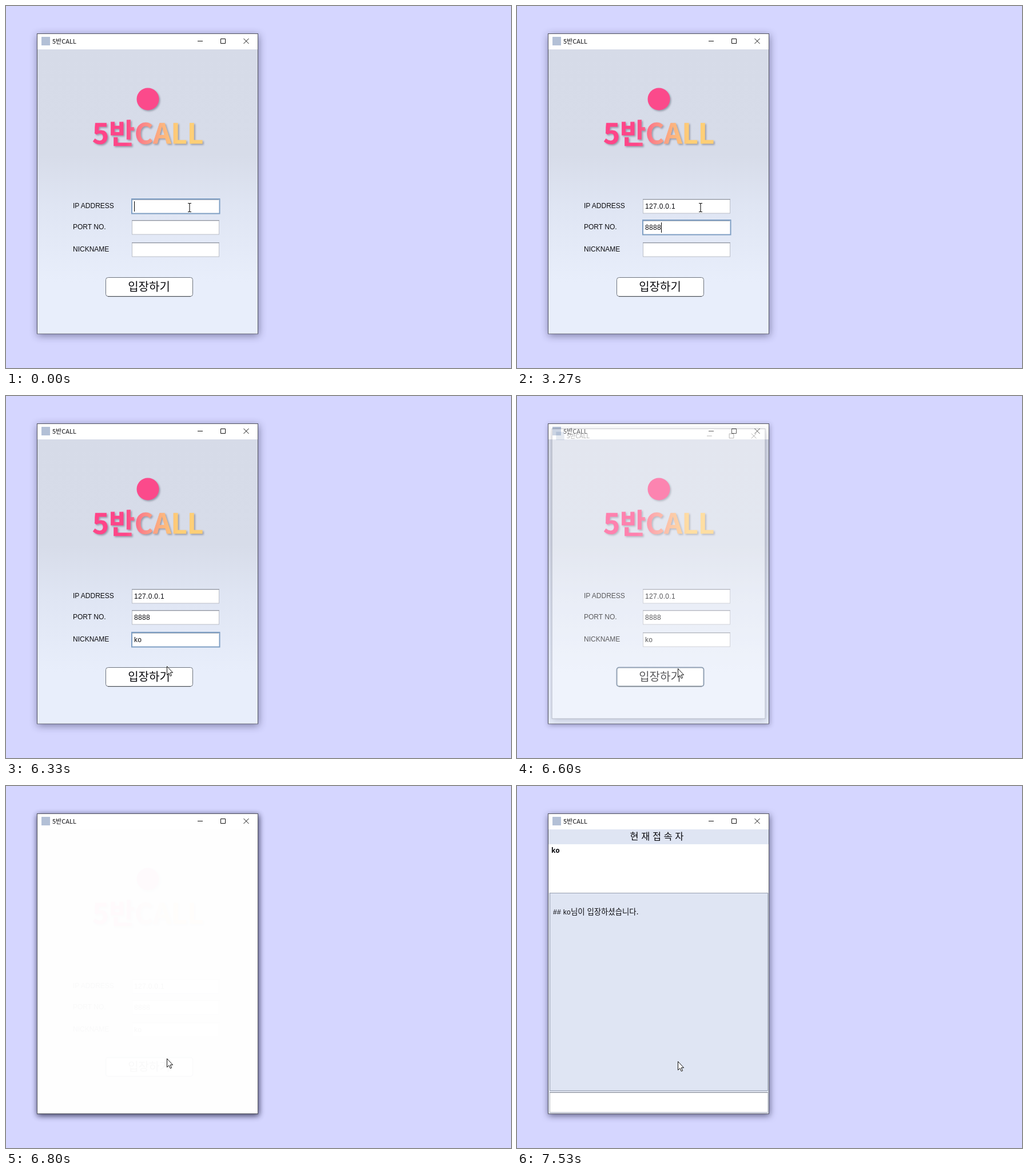
Animation of 883 by 634 pixels, one loop 8 s. Source, as an HTML page:

```html
<!DOCTYPE html>
<html lang="ko">
<head>
<meta charset="utf-8">
<title>5반CALL</title>
<style>
html, body { margin: 0; width: 100%; height: 100%; overflow: hidden; background: #d5d6ff; }
svg { display: block; width: 100vw; height: 100vh; }
text { white-space: pre; font-family: "Liberation Sans", Arial, sans-serif; font-size: 12px; fill: #0c0c10; }
.ko { font-family: "Noto Sans CJK KR", "Noto Sans CJK JP", "Noto Sans CJK", sans-serif; }
.value { letter-spacing: .33px; }
.logo { font-size: 49px; font-weight: 900; fill: url(#candy); stroke: url(#candy); stroke-width: .6; }
.brand { filter: drop-shadow(2px 2px 1.5px rgba(60, 60, 80, .4)); }
.line { fill: none; stroke: #111; }
.pane { stroke: #51525f; }
.box { fill: #fff; stroke: #bbbfc8; }
.ring { fill: #fff; stroke: #7f9fc4; stroke-width: 2; }
#next { transform-origin: 247.5px 310.5px; }
</style>
</head>
<body>
<svg viewBox="0 0 883 634">
  <defs>
    <linearGradient id="candy" gradientUnits="userSpaceOnUse" x1="152" y1="0" x2="344" y2="0">
      <stop offset=".3" stop-color="#ff4588"/>
      <stop offset=".46" stop-color="#fb8888"/>
      <stop offset=".62" stop-color="#fcb17f"/>
      <stop offset=".78" stop-color="#ffcf76"/>
    </linearGradient>
    <linearGradient id="sky" x1="0" y1="0" x2="0" y2="1">
      <stop offset="0" stop-color="#d6dbe8"/>
      <stop offset=".37" stop-color="#d7dce9"/>
      <stop offset=".55" stop-color="#dfe5f3"/>
      <stop offset=".82" stop-color="#e8eefb"/>
      <stop offset="1" stop-color="#e8eefb"/>
    </linearGradient>
    <g id="frame">
      <rect class="pane" x="54.5" y="48.5" width="386" height="525.5" fill="#fff"/>
      <rect x="62" y="54" width="15" height="15" fill="#b3c0d6"/>
      <text class="ko" x="81" y="66" style="font-size:11px">5반CALL</text>
      <path class="line" d="M335 61.5H344M375.5 57.5H383.5V65.5H375.5ZM415.5 57L424.5 66M424.5 57L415.5 66"/>
    </g>
  </defs>

  <g id="login">
    <use href="#frame" id="loginFrame"/>
    <rect x="55" y="76" width="385" height="497.5" fill="url(#sky)"/>
    <g class="brand">
      <circle cx="248" cy="163" r="19.5" fill="#fb4a8b"/>
      <text class="ko logo" x="151" y="241">5반CALL</text>
    </g>
    <g id="fields"></g>
    <rect id="button" x="174.5" y="475.5" width="152" height="33" rx="4" fill="#fff"/>
    <path d="M178 508.7H323" stroke="#3f444c"/>
    <text class="ko" x="250" y="499" text-anchor="middle" style="font-size:20px">입장하기</text>
    <rect id="caret" width="1" height="18"/>
  </g>

  <g id="next">
    <use href="#frame" id="nextFrame"/>
    <g id="chat">
      <rect x="55" y="76" width="385" height="497" fill="#e4e9f4"/>
      <rect x="55" y="76" width="385" height="26" fill="#dfe5f3"/>
      <text class="ko" x="244.5" y="94" text-anchor="middle" style="font-size:16.4px;font-weight:500">현 재 접 속 자</text>
      <rect x="55" y="102" width="385" height="85" fill="#fff"/>
      <text x="60" y="117" style="font:bold 12px 'Open Sans',sans-serif">ko</text>
      <rect x="57.5" y="187.5" width="381" height="346" fill="#dfe5f3" stroke="#969eb0"/>
      <text class="value" x="63" y="225">## ko<tspan class="ko" style="font-size:13.4px;letter-spacing:0">님이 입장하셨습니다.</tspan></text>
      <rect class="box" x="57.5" y="536.5" width="381" height="35"/>
      <path d="M57 536.5H439" stroke="#8d929d"/>
      <path d="M58 537.5H438" stroke="#d9dbe0"/>
    </g>
  </g>

  <g id="arrow">
    <path d="M.5 .5V15.5L3.9 12.3L6.3 17.6L8.6 16.6L6.2 11.4H10.6Z" fill="#fff" stroke="#111"/>
  </g>
  <g id="beam" fill="none">
    <path d="M-3 -7.5H-1L0 -6.5L1 -7.5H3M0 -6.5V6.5M-3 7.5H-1L0 6.5L1 7.5H3" stroke="#fff" stroke-width="2.6"/>
    <path d="M-3 -7.5H-1L0 -6.5L1 -7.5H3M0 -6.5V6.5M-3 7.5H-1L0 6.5L1 7.5H3" stroke="#111" stroke-width="1.1"/>
  </g>
</svg>
<script>
const LOOP = 8000;
const $ = id => document.getElementById(id);

const fields = [
  { label: 'IP ADDRESS', y: 338, text: '127.0.0.1', keys: [270, 400, 600, 800, 930, 1070, 1600, 1870, 2070] },
  { label: 'PORT NO.', y: 375, text: '8888', keys: [2800, 3000, 3130, 3270] },
  { label: 'NICKNAME', y: 414, text: 'ko', keys: [4800, 5400] }
];
const focusTimes = [0, 2270, 3530, 6470];
const caretOff = [[2730, 2800], [4070, 4530], [5270, 5400], [5870, 6400]];

// [time, opacity, scale] of the opening window
const opening = [[0, 0, 1], [6530, .1, .955], [6600, .32, .966], [6670, .65, .985], [6730, .88, .996], [6800, .975, 1], [6870, 1, 1]];
const rests = [[6400, 281, 475], [6470, 281, 477], [7530, 281, 482]];
const chatTime = 6870;

const lastAt = (steps, t) => steps.filter(s => s[0] <= t).pop();

$('fields').innerHTML = fields.map(({ label, y }) => `
  <text x="117" y="${y + 16}">${label}</text>
  <rect class="box" x="220.5" y="${y + .5}" width="152" height="24.5"/>
  <path d="M220 ${y + .5}H373" stroke="#8f949f"/>
  <path d="M221 ${y + 1.5}H372" stroke="#d8dae0"/>
  <g class="focus">
    <rect class="ring" x="220" y="${y}" width="153.5" height="25.5"/>
    <path d="M221 ${y + 1.5}H372" stroke="#a9b0bc"/>
  </g>
  <text class="value" x="224" y="${y + 17}"></text>`).join('');
const values = document.querySelectorAll('#fields .value');
const rings = document.querySelectorAll('#fields .focus');

const show = (el, on) => el.setAttribute('visibility', on ? 'visible' : 'hidden');
const shadow = (el, y, blur, alpha) => {
  el.style.filter = `drop-shadow(1px ${y}px ${blur}px rgba(15, 15, 50, ${alpha}))`;
};

function pointer(t) {
  if (t >= 6400) return lastAt(rests, t).slice(1);
  if (t < 5870) return [321, 353];
  const p = Math.min(1, (Math.floor((t - 5870) / 65) + 1) / 8);
  const eased = p * p * (3 - 2 * p);
  return [321 - 40 * eased, 353 + 120 * eased];
}

function drawPointer(t) {
  const [x, y] = pointer(t).map(Math.round);
  const overField = t < 6330 && fields.some(f => y >= f.y && y <= f.y + 25);
  for (const id of ['arrow', 'beam']) {
    $(id).setAttribute('transform', `translate(${x} ${y})`);
    show($(id), overField === (id === 'beam'));
  }
}

function drawLogin(t) {
  const active = focusTimes.filter(f => f <= t).length - 1;
  fields.forEach((f, i) => {
    values[i].textContent = f.text.slice(0, f.keys.filter(k => k <= t).length);
    show(rings[i], i === active);
  });
  const typing = active < fields.length;
  show($('caret'), typing && !caretOff.some(([a, b]) => t >= a && t < b));
  if (typing) {
    const width = values[active].textContent ? values[active].getComputedTextLength() : 0;
    $('caret').setAttribute('x', 224 + Math.floor(width + .1));
    $('caret').setAttribute('y', fields[active].y + 4);
  }
  $('button').setAttribute('stroke', typing ? '#6d737d' : '#5f7591');
  $('button').setAttribute('stroke-width', typing ? 1 : 2);
  if (t < 6530) shadow($('loginFrame'), 3, 7, .45);
  else shadow($('loginFrame'), 2, 4, .35);
}

function drawNext(t) {
  const [, opacity, scale] = lastAt(opening, t);
  $('next').style.opacity = opacity;
  $('next').style.transform = `scale(${scale})`;
  show($('chat'), t >= chatTime);
  show($('login'), t < chatTime);
  if (t >= chatTime) show($('caret'), false);
  if (t >= chatTime) rings.forEach(r => show(r, false));
}

shadow($('nextFrame'), 3, 6, .6);

function draw() {
  const t = performance.now() % LOOP;
  drawLogin(t);
  drawNext(t);
  drawPointer(t);
  requestAnimationFrame(draw);
}
draw();
</script>
</body>
</html>
```
